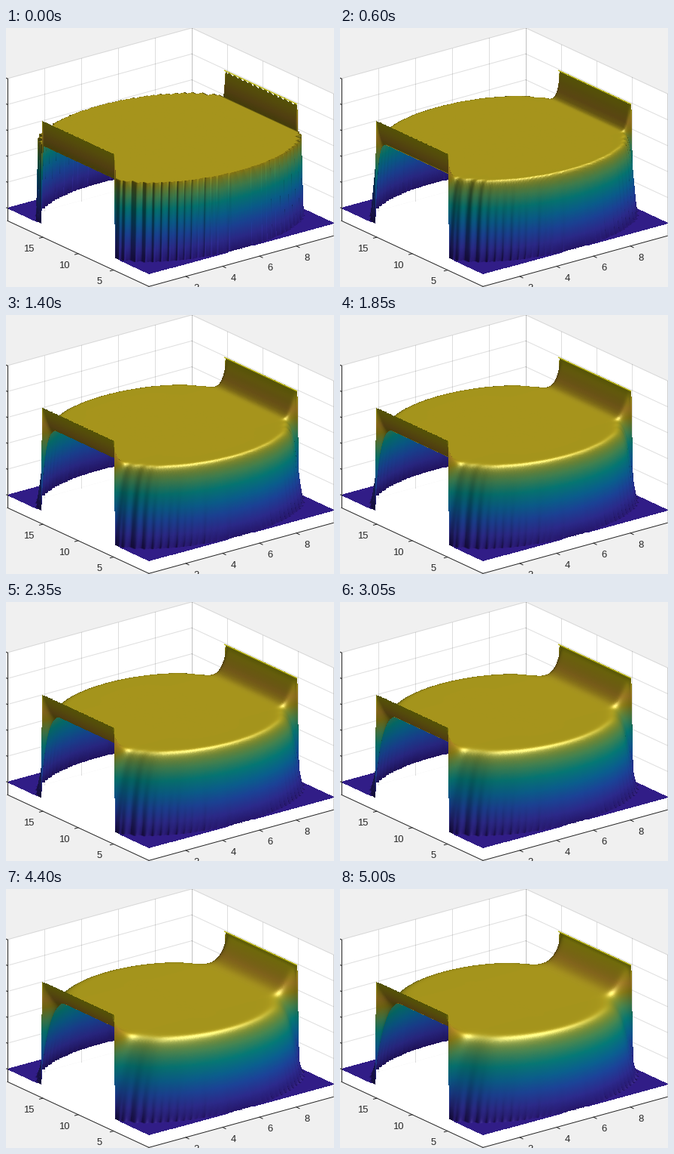
These frames come from a looping animation (436 px wide and 343 px high, 5050 ms). A matplotlib script:

```python
import numpy as np
import matplotlib.pyplot as plt
from matplotlib.animation import FuncAnimation
from matplotlib.colors import LinearSegmentedColormap

W, H = 436, 343
FRAMES, INTERVAL = 101, 50

# Oblique view: pixels per data unit along each axis
ORIGIN = np.array([190.0, 325.5])
AX_X = np.array([24.5, -6.7])
AX_Y = np.array([-9.4, -4.35])
Z_PX = 34.3
Z_LOW, Z_HIGH = -0.49, 5.0

plt.rcParams["font.family"] = "Liberation Sans"

PARULA = LinearSegmentedColormap.from_list("heat", [
    (0.00, (0.22, 0.13, 0.63)),
    (0.12, (0.26, 0.25, 0.83)),
    (0.25, (0.16, 0.40, 0.90)),
    (0.37, (0.06, 0.56, 0.84)),
    (0.50, (0.03, 0.70, 0.68)),
    (0.62, (0.38, 0.74, 0.45)),
    (0.75, (0.77, 0.69, 0.12)),
    (0.83, (0.93, 0.72, 0.20)),
    (0.92, (0.97, 0.86, 0.14)),
    (1.00, (0.97, 0.96, 0.08)),
])


def project(x, y, z=0.0):
    return ORIGIN + x * AX_X + y * AX_Y - np.array([0, z * Z_PX])


# --- heat flow in a stadium: hot straight sides, cold round ends ---
STEP = 0.1
NX, NY = 101, 201
RATE = 0.16
RADIUS = 4.95
STAIR = 0.3
HOT_HALF = 5.1
gx, gy = np.meshgrid(np.arange(NX) * STEP, np.arange(NY) * STEP)
across = np.abs(gx - RADIUS)
along = np.abs(gy - 10)
# the round ends are built from coarse steps
stair = np.minimum(np.ceil(across / STAIR - 1e-9) * STAIR, RADIUS - STEP / 2)
inside = (across < RADIUS - 1e-9) & (along < 5 + np.sqrt(RADIUS**2 - stair**2))
hot = (np.abs(across - RADIUS) < 1e-6) & (along < HOT_HALF + 1e-6)


def diffuse(z):
    p = np.pad(z, 1, mode="edge")
    lap = p[:-2, 1:-1] + p[2:, 1:-1] + p[1:-1, :-2] + p[1:-1, 2:] - 4 * z
    return np.where(inside & ~hot, z + RATE * lap, z)


states = [np.where(hot, 4.0, np.where(inside, 3.0, 0.0))]
while len(states) < FRAMES - 1:
    states.append(diffuse(states[-1]))

# --- lighting ---
FLATNESS = 0.55
AMBIENT, DIFFUSE, SPECULAR, SHINE = 0.34, 0.57, 0.45, 13


def unit(v):
    v = np.asarray(v, float)
    return v / np.linalg.norm(v)


VIEW = unit([-0.52, -0.68, 0.52])
LIGHT = unit([0.12, -0.5, 0.87])
HALF = unit(VIEW + LIGHT)


def lighting(z):
    dy, dx = np.gradient(z, STEP)
    n = np.stack([-dx, -2 * dy, np.full_like(z, FLATNESS)], axis=-1)
    n /= np.linalg.norm(n, axis=-1, keepdims=True)
    n *= np.where(n @ VIEW < 0, -1, 1)[..., None]
    matte = AMBIENT + DIFFUSE * np.maximum(n @ LIGHT, 0)
    gloss = SPECULAR * np.maximum(n @ HALF, 0) ** SHINE
    return matte, gloss


# --- floor samples per pixel column, ordered from back to front ---
SUB = 0.25
px, floor_y = np.meshgrid(np.arange(W) + 0.5, np.arange(170, 328, SUB))
det = -AX_X[0] * AX_Y[1] + AX_X[1] * AX_Y[0]
a, b = px - ORIGIN[0], ORIGIN[1] - floor_y
sx = (-AX_Y[1] * a - AX_Y[0] * b) / det
sy = (AX_X[0] * b + AX_X[1] * a) / det
tol_x, tol_y = -SUB * AX_Y[0] / det, SUB * AX_X[0] / det
valid = (np.abs(sx - 5) <= 5 + tol_x) & (np.abs(sy - 10) <= 10 + tol_y)

ids = np.full(valid.shape, -1)
ids[valid] = np.arange(valid.sum())
linked = valid[:-1] & valid[1:]
back, front = ids[:-1][linked], ids[1:][linked]
seg_col = np.broadcast_to(np.arange(W), linked.shape)[linked]
base_y = floor_y[valid]

u = np.clip(sx[valid], 0, 10) / STEP
v = np.clip(sy[valid], 0, 20) / STEP
iu = np.minimum(u.astype(int), NX - 2)
iv = np.minimum(v.astype(int), NY - 2)
u, v = u - iu, v - iv
corner = iv * NX + iu
weights = [(0, (1 - u) * (1 - v)), (1, u * (1 - v)),
           (NX, (1 - u) * v), (NX + 1, u * v)]


def sample(grid):
    flat = grid.ravel()
    return sum(flat[corner + off] * w for off, w in weights)


def render(z_grid):
    z = sample(z_grid)
    y = base_y - Z_PX * z
    rise = y[front] - y[back]
    count = np.maximum(np.ceil(np.abs(rise)).astype(int), 1)
    seg = np.repeat(np.arange(len(count)), count)
    first = np.cumsum(count) - count
    t = (np.arange(len(seg)) - first[seg]) / count[seg]

    # nearer points overwrite the ones behind them
    row = np.clip((y[back][seg] + t * rise[seg]).astype(int), 0, H - 1)
    top = np.full(W * H, -1)
    top[row * W + seg_col[seg]] = np.arange(len(seg))
    seen = top >= 0
    k = top[seen]
    s, t = seg[k], t[k]

    def blend(values):
        return values[back[s]] * (1 - t) + values[front[s]] * t

    matte, gloss = (blend(sample(g)) for g in lighting(z_grid))
    color = PARULA(blend(z) / 4)[:, :3] * matte[:, None] + gloss[:, None]
    image = np.zeros((W * H, 4))
    image[seen, :3] = np.clip(color, 0, 1)
    image[seen, 3] = 1
    return image.reshape(H, W, 4)


# --- figure, box, grid and ticks ---
fig = plt.figure(figsize=(W / 100, H / 100), dpi=100, facecolor="#f0f0f0")
ax = fig.add_axes([0, 0, 1, 1])
ax.set_axis_off()

DARK = "#262626"


def line(*points, color=DARK, alpha=0.15, width=0.72, zorder=1):
    # separate segments keep the vertical ones crisp
    for (x0, y0), (x1, y1) in zip(points, points[1:]):
        ax.plot([x0, x1], [y0, y1], color=color, alpha=alpha, lw=width,
                zorder=zorder)


def face(*points):
    ax.fill(*zip(*points), color="white", lw=0, zorder=0)


def tick(point, push, label="", shift=(0, 0)):
    line(point, point + np.array(push), alpha=1, zorder=3)
    if label:
        x, y = point + np.array(shift)
        ax.text(x, y + 4.7, label, fontsize=9.4, color=DARK,
                ha="center", va="baseline", zorder=3)


left, right = project(0, 20, Z_LOW), project(10, 0, Z_LOW)
near, far = project(0, 0, Z_LOW), project(10, 20, Z_LOW)
left_top, right_top = project(0, 20, Z_HIGH), project(10, 0, Z_HIGH)
far_top = project(10, 20, Z_HIGH)

face(left, near, right, far)
face(left, far, far_top, left_top)
face(right, far, far_top, right_top)

for x in (0, 2, 4, 6, 8, 10):
    line(project(x, 20, Z_LOW), project(x, 20, Z_HIGH))
for y in (0, 5, 10, 15, 20):
    line(project(10, y, Z_LOW), project(10, y, Z_HIGH))
for z in range(6):
    line(project(0, 20, z), project(10, 20, z), project(10, 0, z))
    tick(project(0, 20, z), (-4, -1.5))
line(left_top, left, near, right, alpha=1, zorder=3)
for x in (2, 4, 6, 8):
    tick(project(x, 0, Z_LOW), (4, 2), str(x), (14, 14.5))
for y in (5, 10, 15):
    tick(project(0, y, Z_LOW), (-4.5, 1.2), str(y), (-19, 14))

surface = ax.imshow(render(states[0]), extent=(0, W, H, 0), aspect="auto",
                    interpolation="nearest", zorder=2)
# lit crest of the far hot wall
line(project(2 * RADIUS, 10 - HOT_HALF, 4), project(2 * RADIUS, 10 + HOT_HALF, 4),
     color="#b9b40f", alpha=1, width=1, zorder=3)
ax.set_xlim(0, W)
ax.set_ylim(H, 0)


def update(i):
    surface.set_data(render(states[max(i - 1, 0)]))
    return [surface]


anim = FuncAnimation(fig, update, frames=FRAMES, interval=INTERVAL,
                     repeat=True, repeat_delay=0)
plt.show()
```
